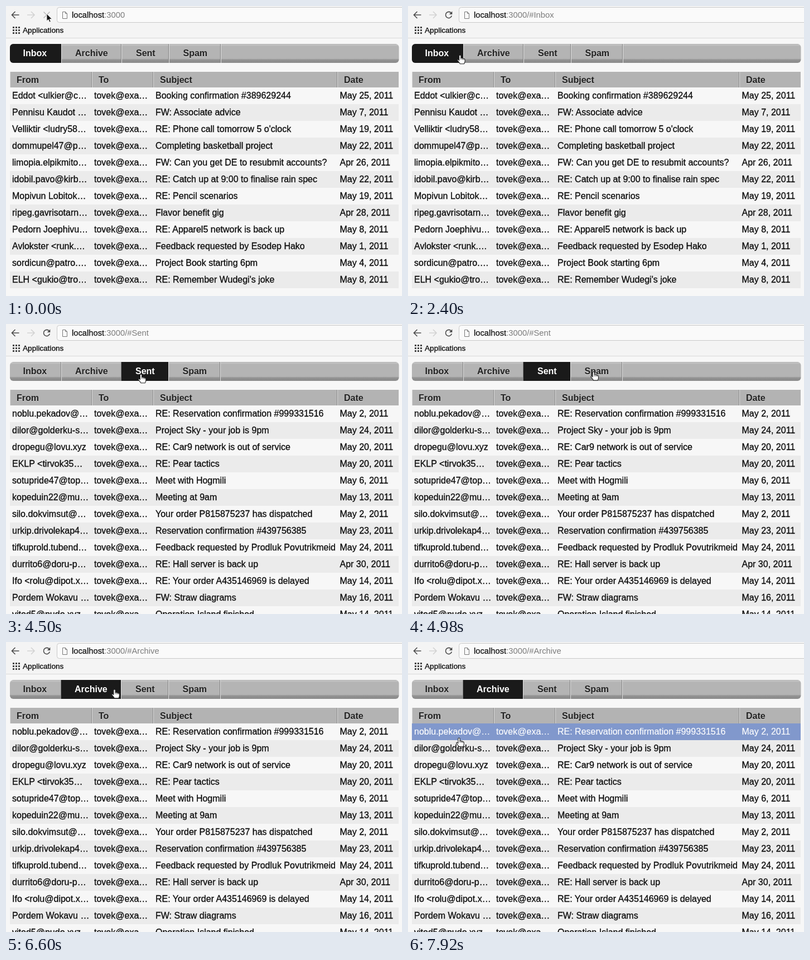
An HTML page that plays this animation: 710 px wide and 520 px high, repeating every 8000 ms.

```html
<!DOCTYPE html>
<html lang="en">
<head>
<meta charset="utf-8">
<title>Mail tabs</title>
<style>
html, body { margin: 0; width: 100%; height: 100%; overflow: hidden; background: #f7f7f7; }
svg { display: block; width: 710px; height: 520px; }
text { font: 16px "Liberation Sans", Arial, sans-serif; fill: #0c0c0c; stroke: #0c0c0c; stroke-width: .3px; white-space: pre; }
.bold { font-weight: bold; fill: #222; stroke: none; }
.shade { font-weight: bold; fill: #fff; stroke: none; opacity: .5; }
.url { font-size: 14.75px; fill: #7c7c7c; stroke: none; }
.url .host { fill: #111; stroke: #111; stroke-width: .25px; }
.mark { font-size: 13.6px; }
.hover text { fill: #fff; stroke: #fff; stroke-width: .15px; }
</style>
</head>
<body>
<svg id="stage" viewBox="0 0 710 520"></svg>
<script>
const LOOP = 8000;
const stage = document.getElementById('stage');

function add(parent, tag, attrs, label) {
  const node = document.createElementNS('http://www.w3.org/2000/svg', tag);
  for (const key in attrs) node.setAttribute(key, attrs[key]);
  if (label !== undefined) node.textContent = label;
  parent.appendChild(node);
  return node;
}
const rect = (parent, x, y, width, height, fill, rx = 0) =>
  add(parent, 'rect', { x, y, width, height, fill, rx });
const line = (parent, d, stroke, width = 1.6) =>
  add(parent, 'path', { d, stroke, 'stroke-width': width, fill: 'none' });
const show = (node, on) => node.setAttribute('display', on ? 'inline' : 'none');

// Each row: sender | subject | day
const inboxRows = `Eddot <ulkier@c…|Booking confirmation #389629244|May 25
Pennisu Kaudot …|FW: Associate advice|May 7
Velliktir <ludry58…|RE: Phone call tomorrow 5 o'clock|May 19
dommupel47@p…|Completing basketball project|May 22
limopia.elpikmito…|FW: Can you get DE to resubmit accounts?|Apr 26
idobil.pavo@kirb…|RE: Catch up at 9:00 to finalise rain spec|May 22
Mopivun Lobitok…|RE: Pencil scenarios|May 19
ripeg.gavrisotarn…|Flavor benefit gig|Apr 28
Pedorn Joephivu…|RE: Apparel5 network is back up|May 8
Avlokster <runk.…|Feedback requested by Esodep Hako|May 1
sordicun@patro.…|Project Book starting 6pm|May 4
ELH <gukio@tro…|RE: Remember Wudegi's joke|May 8`;

const archiveRows = `noblu.pekadov@…|RE: Reservation confirmation #999331516|May 2
dilor@golderku-s…|Project Sky - your job is 9pm|May 24
dropegu@lovu.xyz|RE: Car9 network is out of service|May 20
EKLP <tirvok35…|RE: Pear tactics|May 20
sotupride47@top…|Meet with Hogmili|May 6
kopeduin22@mu…|Meeting at 9am|May 13
silo.dokvimsut@…|Your order P815875237 has dispatched|May 2
urkip.drivolekap4…|Reservation confirmation #439756385|May 23
tifkuprold.tubend…|Feedback requested by Prodluk Povutrikmeid|May 24
durrito6@doru-p…|RE: Hall server is back up|Apr 30
Ifo <rolu@dipot.x…|RE: Your order A435146969 is delayed|May 14
Pordem Wokavu …|FW: Straw diagrams|May 16
vitod5@pudo.xyz|Operation Island finished|May 14`;

const spamRows = `Poduk <kipod27…|@@ Meet new friends online @@|May 4
ovip.ekomvit@co…|Edmolu's n0se is perfect - fix yours t0day|May 16
Egdo <grupod.to…|you're meds order #Y555764626|May 4
dovur.tatmud3@r…|Does FZV excuse the trail?|Apr 29
dropegu.lipkotra…|FREE iVEN 4 GUARANTEED|May 6
Hupritted <vokim…|no other product can help|May 7
Hopuga Wirgosu…|!!Winner!! Place first 1000USD bet free|May 1
Domlitep Kapogi …|2 unread message(s): Hello Zevlor|May 10
pokud.lidopuvke…|Movra Linked Bank Inc|May 20
NQLZ <odukteki…|KedPormuksa5 special offer: 80% off this …|May 4
Ikopulid Nokmitu …|Ticket confirmation #484993598|Apr 27
idkovse.dokvue…|УДВОЕНИЕ СКОРОСТИ ЧТЕНИЯ ЗА 3 …|May 7
lupodra@opsiku…|Stunning replica watches|May 7`;

// Browser chrome
rect(stage, 0, 0, 710, 520, '#f7f7f7');
rect(stage, 0, 0, 710, 57, '#f4f4f4');
rect(stage, 0, 57, 710, 1, '#d9d9d9');
line(stage, 'M23.5 16H11M16.5 10L10.5 16L16.5 22', '#4a4a4a');
line(stage, 'M38 16H50.5M45 10L51 16L45 22', '#d2d2d2');
const stopIcon = line(stage, 'M67.5 10.5L78.5 21.5M78.5 10.5L67.5 21.5', '#bdbdbd');
const reloadIcon = add(stage, 'g', {});
line(reloadIcon, 'M77.3 12.3A5.6 5.6 0 1 0 78.4 17.6', '#4a4a4a');
add(reloadIcon, 'path', { d: 'M79.3 9.5V15H73.8Z', fill: '#4a4a4a' });
add(stage, 'rect', { x: 91.5, y: 2.5, width: 630, height: 27, rx: 4, fill: '#fafafa', stroke: '#c9c9c9' });
line(stage, 'M101.5 10.5H106.5L109.5 13.5V22.5H101.5ZM106.5 10.5V13.5H109.5', '#777', 1);
const url = add(stage, 'text', { x: 118, y: 21, class: 'url' });
add(url, 'tspan', { class: 'host' }, 'localhost');
const urlTail = add(url, 'tspan', {}, ':3000');
for (let i = 0; i < 9; i++) rect(stage, 12 + i % 3 * 5, 37 + Math.floor(i / 3) * 5, 3, 3, '#444');
add(stage, 'text', { x: 30, y: 48, class: 'mark' }, 'Applications');

// Tab bar
const shine = add(stage, 'linearGradient', { id: 'shine', x2: 0, y2: 1 });
[[0, '#a4a4a4'], [.04, '#c6c6c6'], [.12, '#b4b4b4'], [.77, '#b4b4b4'], [.84, '#929292'], [1, '#8a8a8a']]
  .forEach(([offset, color]) => add(shine, 'stop', { offset, 'stop-color': color }));
const clip = add(stage, 'clipPath', { id: 'bar' });
rect(clip, 7, 68, 697.5, 34, '#000', 6);
const bar = add(stage, 'g', { 'clip-path': 'url(#bar)' });
rect(bar, 7, 68, 698, 34, 'url(#shine)');
const edges = [7, 99, 207, 292, 385];
const tabs = ['Inbox', 'Archive', 'Sent', 'Spam'].map((name, i) => {
  const group = add(bar, 'g', {});
  const left = edges[i] + (i ? 1 : 0), right = edges[i + 1], x = [30.5, 124, 233, 317.5][i];
  rect(group, right - 1, 68, 1, 34, '#808080');
  rect(group, right, 68, 1, 34, '#e2e2e2');
  const fill = rect(group, left, 68, right - left, 34, '#1a1a1a');
  const shade = add(group, 'text', { x, y: 91, class: 'shade' }, name);
  const label = add(group, 'text', { x, y: 90, class: 'bold' }, name);
  return { group, fill, shade, label };
});

function setTab(active) {
  tabs.forEach((tab, i) => {
    const on = i === active;
    tab.group.setAttribute('transform', `translate(${active > 0 && i >= active ? -1 : 0} 0)`);
    show(tab.fill, on);
    show(tab.shade, !on);
    tab.label.style.fill = on ? '#fff' : '';
  });
}

// Table
rect(stage, 7, 118, 697, 28, '#b3b3b3');
[['From', 19, 7], ['To', 166, 154], ['Subject', 276, 264], ['Date', 606, 594]].forEach(([name, x, left]) => {
  rect(stage, left - 1, 118, 1, 28, left > 7 ? '#8a8a8a' : '#f7f7f7');
  rect(stage, left, 118, 1, 28, '#dcdcdc');
  add(stage, 'text', { x, y: 139, class: 'shade' }, name);
  add(stage, 'text', { x, y: 138, class: 'bold' }, name);
});
const tables = [inboxRows, archiveRows, spamRows].map(source => {
  const group = add(stage, 'g', {});
  const rows = source.split('\n').map((entry, i) => {
    const [from, subject, day] = entry.split('|');
    const y = 146 + i * 30;
    const row = add(group, 'g', {});
    const back = rect(row, 7, y, 697, 30, '#f7f7f7');
    [[11, from], [158, 'tovek@exa…'], [268, subject], [598.5, day + ', 2011']]
      .forEach(([x, label]) => add(row, 'text', { x, y: y + 20 }, label));
    return { row, back };
  });
  return { group, rows };
});

function setHover(table, y) {
  const over = y >= 146 ? Math.floor((y - 146) / 30) : -1;
  table.rows.forEach(({ row, back }, i) => {
    row.setAttribute('class', i === over ? 'hover' : '');
    back.setAttribute('fill', i === over ? '#8198cc' : i % 2 ? '#ebebeb' : '#f7f7f7');
  });
}

// Pointer
const arrow = add(stage, 'path', {
  d: 'M0 0V13L3 10.2L5 15L7.2 14L5.2 9.6H9.4Z', fill: '#111', stroke: '#fff', 'stroke-width': .8
});
const hand = add(stage, 'g', {});
add(hand, 'path', {
  d: 'M-1.6 1Q0 -1 1.6 1V5.5Q3.2 4.6 4.2 6Q5.8 5.4 6.6 6.8Q8.6 6.4 8.8 8.4V11.5Q8.6 14 7.2 15.8H0Q-1.5 13.5 -4.8 9.6Q-4.8 7.6 -2.8 8.4L-1.6 9.6Z',
  fill: '#fff', stroke: '#222', 'stroke-width': 1.1, 'stroke-linejoin': 'round'
});
line(hand, 'M1.6 5.5V8.5M4.2 6V8.8M6.6 6.8V9', '#222', .8);

// start, end, x, y
const moves = [
  [600, 1020, 68.5, 87], [2340, 2580, 139, 89.5], [3540, 3840, 242, 90],
  [4860, 5040, 349.5, 84.5], [6000, 6180, 194.5, 85], [7200, 7920, 91.5, 172]
];
const TICK = 60;

function pointerAt(t) {
  let x = 73, y = 14;
  for (const [start, end, toX, toY] of moves) {
    if (t < start) break;
    const p = Math.min(1, (Math.floor((t - start) / TICK) + 1) / ((end - start) / TICK + 1));
    const eased = p * p * (3 - 2 * p);
    x += (toX - x) * eased;
    y += (toY - y) * eased;
  }
  return [x, y];
}

// Value of the last entry whose time has come
const pick = (steps, t) => steps.filter(([at]) => at <= t).pop()[1];
const tabSteps = [[0, 0], [3000, 1], [4500, 2], [5640, 3], [6600, 1]];
const tableSteps = [[0, 0], [3060, 1], [5640, 2], [6600, 1]];
const urlSteps = [[0, ''], [1980, '/#Inbox'], [3000, '/#Archive'], [4500, '/#Sent'],
  [5640, '/#Spam'], [6600, '/#Archive']];

function draw(t) {
  const [x, y] = pointerAt(t);
  const current = pick(tableSteps, t);
  setTab(pick(tabSteps, t));
  tables.forEach((table, i) => show(table.group, i === current));
  setHover(tables[current], y);
  urlTail.textContent = ':3000' + pick(urlSteps, t);
  show(stopIcon, y < 28);
  show(reloadIcon, y >= 28);
  show(arrow, y < 68);
  show(hand, y >= 68);
  for (const shape of [arrow, hand]) shape.setAttribute('transform', `translate(${x} ${y})`);
}

const began = performance.now();
function frame() {
  draw((performance.now() - began) % LOOP);
  requestAnimationFrame(frame);
}
frame();
</script>
</body>
</html>
```
